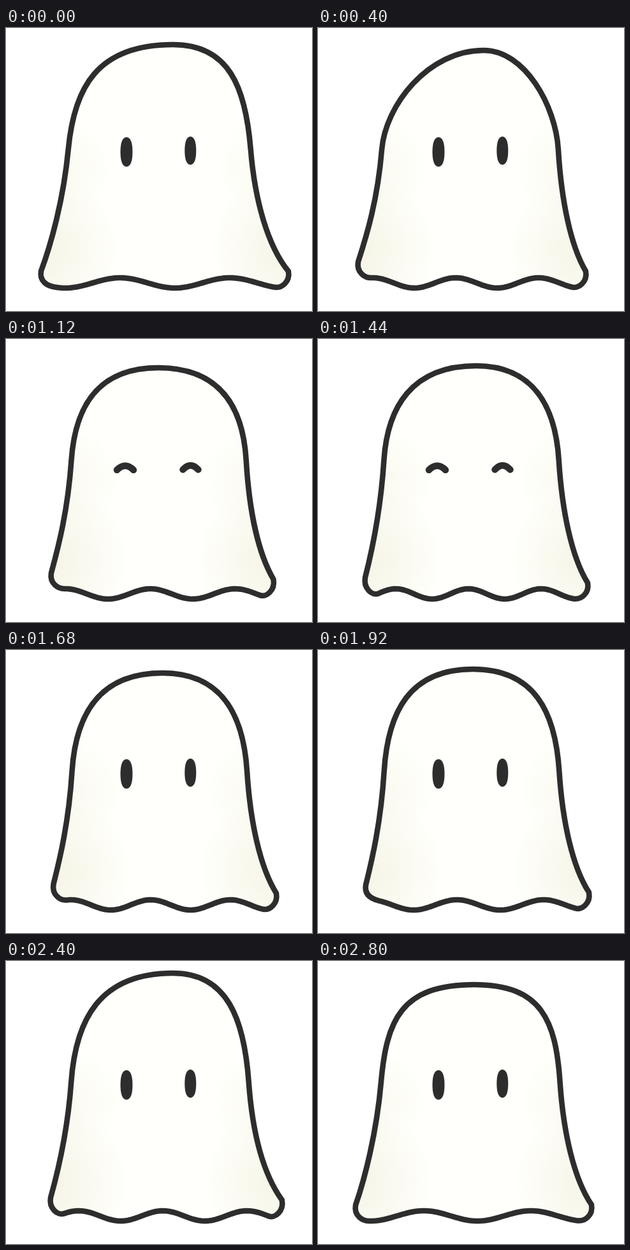
An HTML page with a canvas that plays this animation: 480 by 443 pixels, repeating every 2.88 s.

```html
<!DOCTYPE html>
<html lang="en">
<head>
<meta charset="utf-8">
<title>Ghost</title>
<style>
  html, body { margin: 0; width: 100%; height: 100%; overflow: hidden; background: #fff; }
  canvas { display: block; width: 480px; height: 443px; }
</style>
</head>
<body>
<canvas id="stage" width="480" height="443"></canvas>
<script>
const LOOP = 2880, STEP = 80, INK = '#2d2d2d';
const SHUT_FROM = 640, SHUT_TO = 1680;
const SHOULDER = 190, HEM = 399, WAVE = 8, INSET = 21;
const ctx = document.getElementById('stage').getContext('2d');

// Key poses: crown position, roundness, corner x positions, middle hem trough and half wavelength
const poses = [
  { t: 0, x: 262, y: 26, round: .73, left: 55, right: 443, trough: 265, gap: 86 },
  { t: 400, x: 260, y: 35, round: .55, left: 63, right: 420, trough: 281, gap: 65 },
  { t: 800, x: 230, y: 48, round: .72, left: 68, right: 416, trough: 293, gap: 76 },
  { t: 1440, x: 248, y: 42, round: .7, left: 74, right: 423, trough: 293, gap: 57 },
  { t: 1920, x: 243, y: 30, round: .72, left: 75, right: 425, trough: 286, gap: 68 },
  { t: 2400, x: 262, y: 19, round: .72, left: 70, right: 433, trough: 312, gap: 66 },
  { t: 2800, x: 245, y: 37, round: .79, left: 59, right: 429, trough: 250, gap: 84 }
];
poses.push({ ...poses[0], t: LOOP });

function poseAt(t) {
  const i = poses.findIndex(p => p.t > t), a = poses[i - 1], b = poses[i];
  const k = (t - a.t) / (b.t - a.t), pose = {};
  for (const key in a) pose[key] = a[key] + (b[key] - a[key]) * k;
  return pose;
}

const hemY = (p, x) => HEM + WAVE * Math.cos(Math.PI * (x - p.trough) / p.gap);

// Bezier points from the crown down one side to the start of the hem
function half(p, corner, rest, middle, lean, bend) {
  const shoulder = middle + (corner - rest) * .3;
  const flare = corner - shoulder, dir = Math.sign(flare);
  const slope = lean * flare / 180, rise = (SHOULDER - p.y) * p.round * .8;
  const x = corner - dir * INSET, y = hemY(p, x), cy = y - 25;
  const tilt = (hemY(p, x + 1) - y) * 10 * dir;
  return [
    [p.x, p.y],
    [p.x + (shoulder - p.x) * p.round, p.y],
    [shoulder - slope * rise, SHOULDER - rise],
    [shoulder, SHOULDER],
    [shoulder + slope * 80, SHOULDER + 80],
    [corner - flare * bend, cy - 40],
    [corner, cy],
    [corner + dir * 3, cy + 17],
    [x + dir * 10, y + tilt],
    [x, y]
  ];
}

function curves(path, points) {
  for (let i = 1; i < points.length; i += 3)
    path.bezierCurveTo(...points[i], ...points[i + 1], ...points[i + 2]);
}

function outline(p) {
  const left = half(p, p.left, 66, 101, .4, .35);
  const right = half(p, p.right, 427, 379, .25, .55);
  const path = new Path2D();
  path.moveTo(p.x, p.y);
  curves(path, left);
  for (let x = p.left + INSET; x < p.right - INSET; x += 4) path.lineTo(x, hemY(p, x));
  path.lineTo(...right[9]);
  curves(path, right.reverse());
  path.closePath();
  return path;
}

function shade(x, y, r, alpha) {
  const g = ctx.createRadialGradient(x, y, 0, x, y, r);
  g.addColorStop(0, `rgba(236,233,208,${alpha})`);
  g.addColorStop(1, 'rgba(236,233,208,0)');
  ctx.fillStyle = g;
  ctx.fillRect(0, 0, 480, 443);
}

function body(p) {
  const path = outline(p);
  ctx.fillStyle = '#fffffb';
  ctx.fill(path);
  ctx.save();
  ctx.clip(path);
  for (const x of [p.left, p.right]) {
    shade(x, 345, 120, .5);
    shade(x + (240 - x) * .15, 220, 80, .25);
  }
  ctx.restore();
  ctx.lineWidth = 8.6;
  ctx.stroke(path);
}

function openEye(x, y, w, h) {
  const kx = w * .64, ky = h * .66;
  ctx.beginPath();
  ctx.moveTo(x, y - h);
  ctx.bezierCurveTo(x + kx, y - h, x + w, y - ky, x + w, y);
  ctx.bezierCurveTo(x + w, y + ky, x + kx, y + h, x, y + h);
  ctx.bezierCurveTo(x - kx, y + h, x - w, y + ky, x - w, y);
  ctx.bezierCurveTo(x - w, y - ky, x - kx, y - h, x, y - h);
  ctx.fill();
}

function shutEye(x, y, w) {
  ctx.beginPath();
  ctx.moveTo(x - w, y);
  ctx.quadraticCurveTo(x, y - 13, x + w, y);
  ctx.stroke();
}

function eyes(t) {
  if (t >= SHUT_FROM && t < SHUT_TO) {
    ctx.lineWidth = 10.5;
    shutEye(187, 205, 13);
    shutEye(289.5, 204.5, 12);
  } else {
    ctx.fillStyle = INK;
    openEye(189, 194, 9.5, 23);
    openEye(289.3, 192, 9, 22);
  }
}

const start = performance.now();
function draw(now) {
  const t = Math.floor(Math.max(0, now - start) % LOOP / STEP) * STEP;
  ctx.clearRect(0, 0, 480, 443);
  ctx.strokeStyle = INK;
  ctx.lineCap = ctx.lineJoin = 'round';
  body(poseAt(t));
  eyes(t);
  requestAnimationFrame(draw);
}
draw(start);
</script>
</body>
</html>
```
